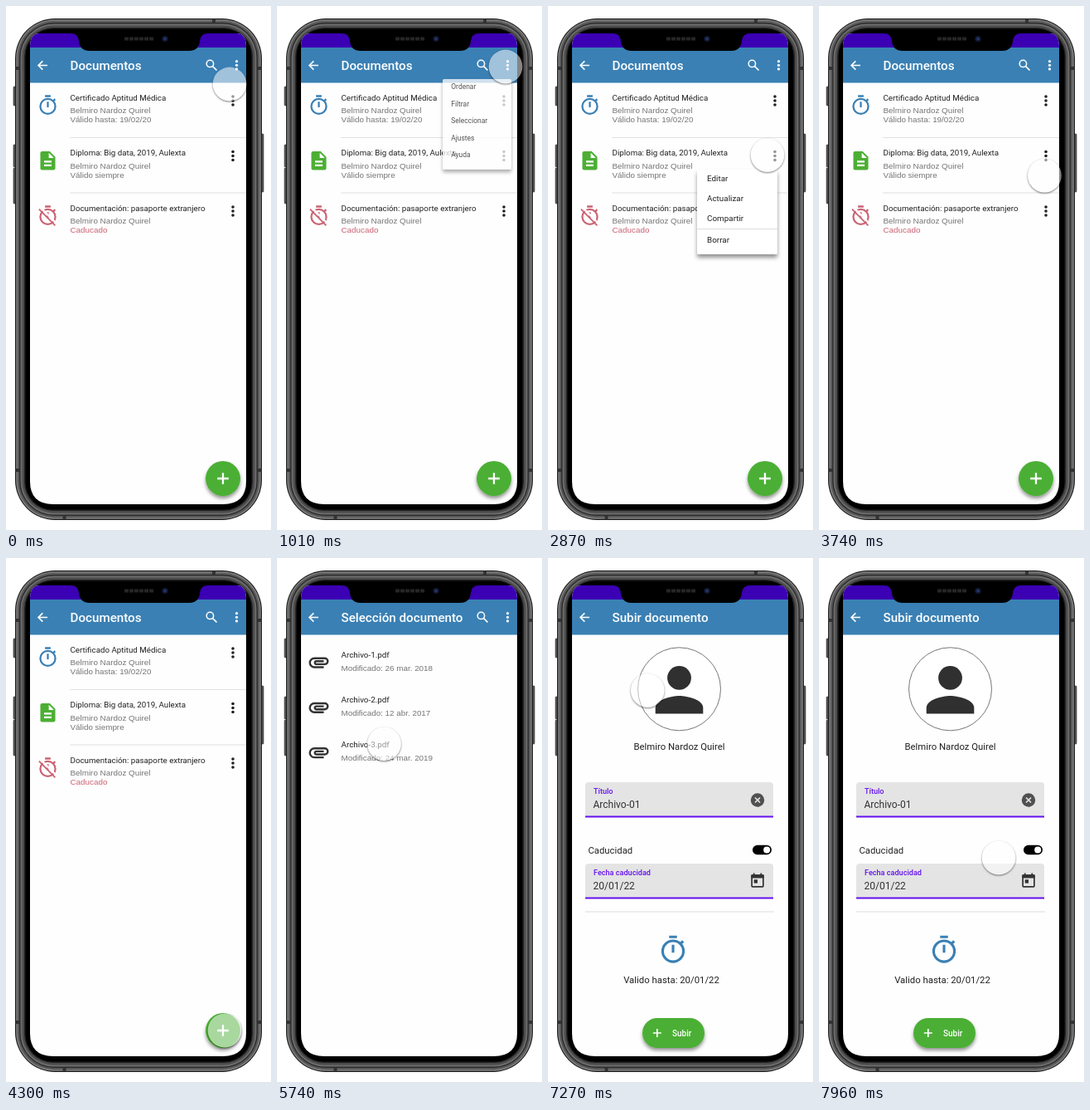
Recreate the animation shown at these times as an HTML page. Size 320x631 px, loop 8000 ms.

```html
<!DOCTYPE html>
<html lang="es">
<head>
<meta charset="utf-8">
<title>Documentos</title>
<style>
html, body { margin: 0; width: 100%; height: 100%; overflow: hidden; background: #fff; }
svg { display: block; width: 100vw; height: 100vh; }
text { font-family: Roboto, sans-serif; white-space: pre; }
.sub { font-family: "Liberation Sans", Arial, sans-serif; }
</style>
</head>
<body>
<svg id="stage" viewBox="0 0 320 631"></svg>
<script>
const LOOP = 8000;
const BLUE = '#3a80b4', GREEN = '#4caf34', RED = '#cb6474', PURPLE = '#6510ee', INK = '#212121', GRAY = '#757575';
const PERSON = 'Belmiro Nardoz Quirel';

// Shape helpers
const text = (x, y, str, size, fill = INK, extra = '') =>
  `<text x="${x}" y="${y}" font-size="${size}" fill="${fill}" ${extra}>${str}</text>`;
const sub = (x, y, str, fill = GRAY) => text(x, y, str, 9.85, fill, 'class="sub"');
const rect = (x, y, w, h, r, fill, extra = '') =>
  `<rect x="${x}" y="${y}" width="${w}" height="${h}" rx="${r}" fill="${fill}" ${extra}/>`;
const circle = (x, y, r, fill, extra = '') => `<circle cx="${x}" cy="${y}" r="${r}" fill="${fill}" ${extra}/>`;
const line = (d, color, width, extra = '') =>
  `<path d="${d}" fill="none" stroke="${color}" stroke-width="${width}" ${extra}/>`;
const icon = (x, y, scale, body) =>
  `<g transform="translate(${x} ${y}) scale(${scale}) translate(-12 -12)">${body}</g>`;
const kebab = (x, y, gap, r, fill) => [-gap, 0, gap].map(d => circle(x, y + d, r, fill)).join('');
const plus = (x, y, r, width) => line(`M${x - r} ${y}h${2 * r}M${x} ${y - r}v${2 * r}`, '#fff', width);

// Icons on a 24 unit grid
const timer = color => line('M9 2h6M12 8v6M17.8 7.2l2-2', color, 2) +
  circle(12, 13, 8, 'none', `stroke="${color}" stroke-width="2"`);
const timerOff = color => timer(color) +
  line('M4 2.8L21.6 20.4', '#fefefe', 2) + line('M2.6 4.8L19.9 22.2', color, 1.6);
const page = `<path d="M14 2H6a2 2 0 0 0-2 2v16a2 2 0 0 0 2 2h12a2 2 0 0 0 2-2V8z" fill="${GREEN}"/>` +
  '<path d="M13 3.5V9h5.5z" fill="#fff"/>' + line('M8 13h8M8 17h8', '#fff', 2);
const clip = line('M17 17H7.5a4.5 4.5 0 0 1 0-9H18a3 3 0 0 1 0 6H9.5a1.5 1.5 0 0 1 0-3H17', '#333', 2);
const person = circle(12, 8, 4, '#303030') +
  '<path d="M12 14c-2.7 0-8 1.3-8 4v2h16v-2c0-2.7-5.3-4-8-4z" fill="#303030"/>';
const calendar = rect(4, 4, 16, 16, 1, 'none', 'stroke="#333" stroke-width="2"') +
  rect(3, 3, 18, 5, 1, '#333') + rect(7, 10, 5, 5, 0, '#333') + line('M7 1v3M17 1v3', '#333', 2);

const header = (title, actions = true) => rect(29, 50, 262, 42.5, 0, BLUE) +
  line('M50 71.5H39.5M44.3 66.3l-5.2 5.2 5.2 5.2', '#fff', 1.7) +
  text(77.5, 77, title, 15.2, '#fff', 'font-weight="500"') +
  (actions ? circle(246.4, 69.4, 4.2, 'none', 'stroke="#fff" stroke-width="1.5"') +
    line('M249.5 72.5l5 5', '#fff', 1.7) + kebab(278.5, 71.3, 4.6, 1.6, '#fff') : '');

function listScreen() {
  const rows = [
    ['Certificado Aptitud Médica', 'Válido hasta: 19/02/20', GRAY, timer(BLUE)],
    ['Diploma: Big data, 2019, Aulexta', 'Válido siempre', GRAY, page],
    ['Documentación: pasaporte extranjero', 'Caducado', RED, timerOff(RED)],
  ];
  return header('Documentos') + rows.map(([title, state, color, glyph], i) => {
    const y = i * 66.5;
    return text(77.5, 113.6 + y, title, 9.75) + sub(77.5, 129.1 + y, PERSON) +
      sub(77.5, 140.3 + y, state, color) + kebab(274, 114 + y, 5, 1.8, INK) +
      icon(50.5, 119.8 + y, 1.13, glyph) +
      (i < 2 ? rect(77, 158 + y, 213, 1, 0, '#e2e2e2') : '');
  }).join('') + circle(262, 569, 21, GREEN, 'filter="url(#lift)"') + plus(262, 569, 6.8, 2.3);
}

function fileScreen() {
  const dates = ['26 mar. 2018', '12 abr. 2017', '24 mar. 2019'];
  return header('Selección documento') + dates.map((date, i) => {
    const y = i * 54.3;
    return icon(50.5, 125.5 + y, 1.2, clip) + text(77.5, 119.8 + y, `Archivo-${i + 1}.pdf`, 9.85) +
      sub(77.5, 135.6 + y, 'Modificado: ' + date);
  }).join('');
}

const field = (y, label, value) =>
  `<path d="M45 ${y + 42}v-38q0-4 4-4h219q4 0 4 4v38z" fill="#e4e4e4"/>` +
  rect(45, y + 40.5, 227, 2, 0, PURPLE) +
  text(55, y + 14.3, label, 9.1, PURPLE, 'font-weight="500"') + text(54.5, y + 31, value, 12, '#333');

function formScreen() {
  const centered = 'text-anchor="middle"';
  return header('Subir documento', false) +
    circle(158.5, 157.8, 50, '#fff', 'stroke="#777" stroke-width="1"') + icon(158.5, 158.8, 3.6, person) +
    text(158.5, 231, PERSON, 11.35, INK, centered) +
    field(270, 'Título', 'Archivo-01') + circle(253, 291.5, 8.2, '#505050') +
    line('M250 288.5l6 6M256 288.5l-6 6', '#e4e4e4', 1.6) +
    text(48.5, 356, 'Caducidad', 11.3) + rect(247, 345.7, 23, 11.5, 5.75, '#000') + circle(264.2, 351.5, 4, '#fff') +
    field(368, 'Fecha caducidad', '20/01/22') + icon(253, 389, 0.86, calendar) +
    rect(45, 425.5, 228, 1, 0, '#dedede') + icon(151, 472, 1.57, timer(BLUE)) +
    text(149, 511.5, 'Valido hasta: 20/01/22', 11.35, INK, centered) +
    rect(114, 554, 75, 36, 18, GREEN, 'filter="url(#lift)"') + plus(131.8, 572, 5, 1.7) +
    text(150, 575.6, 'Subir', 10, '#fff', 'font-weight="500"');
}

// Popup whose right corner hangs below its three dots
function menu(id, x, y, height, items, divided) {
  return `<g id="${id}">` + rect(x, y, 97, height, 2, '#fff', 'filter="url(#float)"') +
    items.map((item, i) =>
      text(x + 12, y + 14 + i * 24 + (divided && i === 3 ? 2 : 0), item, 9.9)).join('') +
    (divided ? rect(x, y + 71, 97, 1, 0, '#dedede') : '') + '</g>';
}

// Metal rim as nested rounded rectangles: inset and colour
function phone() {
  const shell = [[0, '#1c1c1c'], [1.2, '#808080'], [2.8, '#5a5a5a'], [5, '#2c2c2c'],
    [6.5, '#6c6c6c'], [8.5, '#4c4c4c'], [11, '#222'], [12.5, '#000']];
  const buttons = [[9, 97, 23], [9, 167, 27], [9, 195, 43], [307.5, 154, 70]];
  const bands = [[249, 15.5, 4, 5], [68.5, 613.5, 4, 5], [11.5, 73, 5, 4], [11.5, 557, 5, 4], [303.5, 73, 5, 4], [303.5, 557, 5, 4]];
  return buttons.map(([x, y, h]) => rect(x, y, 3.5, h, 1, '#555', 'stroke="#222" stroke-width=".6"')).join('') +
    shell.map(([d, color]) => rect(11 + d, 15 + d, 298 - 2 * d, 604 - 2 * d, 48 - d * 1.2, color)).join('') +
    bands.map(([x, y, w, h]) => rect(x, y, w, h, 0, '#333')).join('');
}

const notch = '<path d="M78 33q9 0 10 9q1 12 13 12h120q12 0 13-12q1-9 10-9z" fill="#000"/>' +
  line('M143 39.5h35', '#262626', 4, 'stroke-dasharray="5 1"') +
  circle(192, 39.5, 3.6, '#141a38') + circle(192, 39.5, 1.5, '#2a3a78');

document.getElementById('stage').innerHTML = `<defs>
  <filter id="lift" x="-30%" y="-30%" width="160%" height="170%">
    <feDropShadow dx="0" dy="3" stdDeviation="2" flood-opacity=".42"/></filter>
  <filter id="float" x="-30%" y="-30%" width="160%" height="170%">
    <feDropShadow dx="0" dy="4" stdDeviation="2.6" flood-opacity=".42"/></filter>
  <filter id="halo" x="-30%" y="-30%" width="160%" height="160%">
    <feGaussianBlur stdDeviation=".8"/></filter>
  <clipPath id="glass"><path d="M29 50q0-17 11-17h239q11 0 11 17v522q0 28-28 28H57q-28 0-28-28z"/></clipPath>
  <mask id="ring"><rect width="100%" height="100%" x="-50%" y="-50%" fill="#fff"/><circle r="20.3"/></mask>
  </defs>${phone()}
  <g clip-path="url(#glass)">${rect(29, 33, 262, 568, 0, '#fefefe')}${rect(29, 33, 262, 17, 0, '#3b00b4')}
    <g id="list">${listScreen()}</g><g id="files">${fileScreen()}</g><g id="form">${formScreen()}</g>
    ${menu('topMenu', 186, 88, 127, ['Ordenar', 'Filtrar', 'Seleccionar', 'Ajustes', 'Ayuda'], false)}
    ${menu('rowMenu', 180, 197, 102, ['Editar', 'Actualizar', 'Compartir', 'Borrar'], true)}
  </g>${notch}
  <g id="touch"><g mask="url(#ring)">${circle(0, 1, 20.3, '#000', 'opacity=".55" filter="url(#halo)"')}</g>
    ${circle(0, 0, 20.4, '#fff', 'opacity=".52"')}</g>`;

// Touch path: start ms, end ms, x, y, sideways bulge
const START = [270, 94];
const MOVES = [
  [40, 360, 279, 78, 0], [660, 770, 276, 73, 0], [2000, 2540, 265, 179.5, 2], [3620, 4300, 264, 569, 14],
  [5140, 5940, 104, 175, 8], [5980, 6450, 105, 123, 0], [7140, 7640, 216, 388, 0], [7660, 7930, 217, 361, 0],
];
const clamp = v => Math.min(1, Math.max(0, v));
const ease = p => p < 0.5 ? 2 * p * p : 1 - 2 * (1 - p) * (1 - p);

function touchAt(t) {
  let [x, y] = START;
  for (const [from, to, endX, endY, bulge] of MOVES) {
    if (t < from) break;
    const p = clamp((t - from) / (to - from)), e = ease(p);
    x += (endX - x) * e + bulge * Math.sin(Math.PI * p);
    y += (endY - y) * e;
  }
  return [x, y];
}

const el = id => document.getElementById(id);
const show = (id, visible) => { el(id).style.display = visible ? '' : 'none'; };

function popup(id, t, open, close, right, top) {
  const grow = ease(clamp((t - open) / 170)), fade = clamp((t - close) / 170);
  show(id, grow > 0 && fade < 1);
  const scale = 0.4 + 0.6 * grow;
  el(id).setAttribute('opacity', grow * (1 - fade));
  el(id).setAttribute('transform', `translate(${right} ${top}) scale(${scale}) translate(${-right} ${-top})`);
}

function frame() {
  const t = performance.now() % LOOP;
  show('list', t < 4680);
  show('files', t >= 4680 && t < 6760);
  show('form', t >= 6760);
  popup('topMenu', t, 900, 1700, 283, 88);
  popup('rowMenu', t, 2690, 3310, 277, 197);
  el('touch').setAttribute('transform', `translate(${touchAt(t)})`);
  requestAnimationFrame(frame);
}
frame();
</script>
</body>
</html>
```
